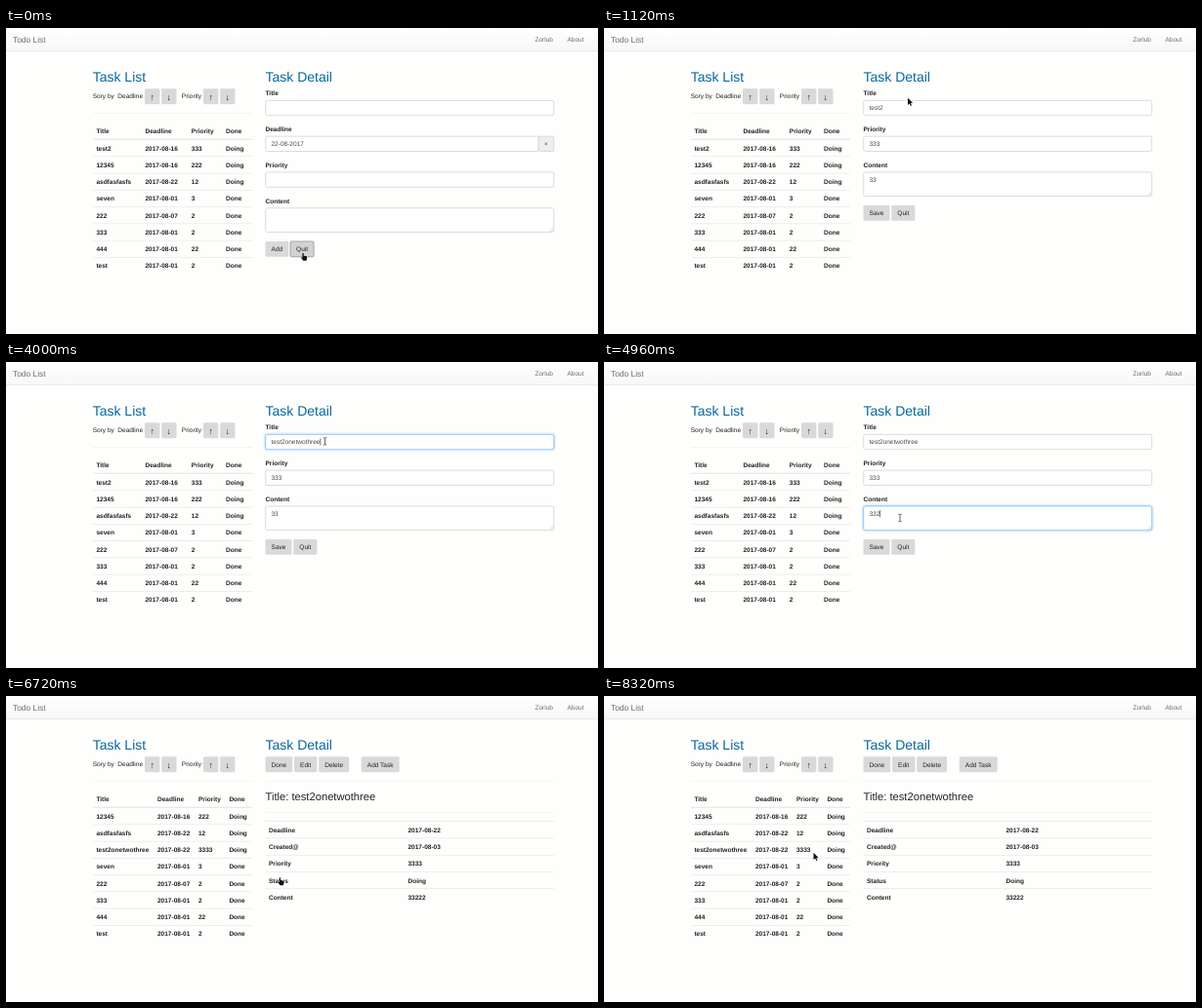
Write an HTML page that moves like this. It is 606x314 px and loops after 8480 ms.

```html
<!DOCTYPE html>
<html lang="en">
<head>
<meta charset="utf-8">
<title>Todo List</title>
<style>
html, body { margin: 0; width: 100%; height: 100%; overflow: hidden; background: #fefefd; }
svg { display: block; width: 100vw; height: 100vh; }
text { font-family: "Liberation Sans", Arial, sans-serif; text-rendering: geometricPrecision; white-space: pre; }
.focus { filter: drop-shadow(0 0 1.6px rgba(102, 175, 233, .75)); }
</style>
</head>
<body>
<svg id="stage" viewBox="0 0 606 314"></svg>
<script>
const stage = document.getElementById('stage');
const ruler = document.createElement('canvas').getContext('2d');
ruler.font = '100px "Liberation Sans", Arial, sans-serif';

const LOOP = 8480, FONT = 6.53, ROW = 17.25;
const LEFT = 265.5, RIGHT = 561, INPUT_H = 15.85;
const widthOf = s => ruler.measureText(s).width * FONT / 100;

// y is the middle of the capitals
const text = (x, y, s, { size = FONT, fill = '#222', bold = false, anchor = 'start' } = {}) =>
  `<text x="${x}" y="${y + size * .36}" font-size="${size}" fill="${fill}" text-anchor="${anchor}"` +
  `${bold ? ' font-weight="700"' : ''}>${s}</text>`;
const strong = (x, y, s) => text(x, y, s, { bold: true });
const rect = (x, y, w, h, fill, extra = '') =>
  `<rect x="${x}" y="${y}" width="${w}" height="${h}" fill="${fill}" ${extra}/>`;
const rule = (x1, x2, y, color = '#ddd', w = .5) => rect(x1, y - w / 2, x2 - x1, w, color);

function button(x, y, label, pressed) {
  const w = widthOf(label) + 12.1;
  const size = label.length > 1 ? FONT : 9;
  const edge = pressed ? 'stroke="#8c8c8c" stroke-width=".7"' : '';
  return rect(x, y, w, INPUT_H, pressed ? '#d2d2d2' : '#d9d9d9', `rx="1.3" ${edge}`) +
    text(x + w / 2, y + 8, label, { size, anchor: 'middle' });
}

function buttonRow(x, y, labels, pressed) {
  let out = '';
  for (const label of labels) {
    out += button(x, y, label, label === pressed);
    x += widthOf(label) + 13.9;
  }
  return out;
}

function field(label, y, value, { focus, caret, underline, h = INPUT_H, w = RIGHT - LEFT } = {}) {
  const mid = y + 7.9, end = 271.5 + widthOf(value);
  const edge = focus ? 'stroke="#66afe9" class="focus"' : 'stroke="#c4c4c4"';
  let out = strong(LEFT, y - 7, label) +
    rect(LEFT + .25, y + .25, w - .5, h - .5, '#fff', `rx="1.8" stroke-width=".6" ${edge}`) +
    text(271.5, mid, value, { fill: '#4a4a4a' });
  if (underline) out += rule(271.5, end, mid + 3.6, '#888');
  if (caret) out += rect(end, mid - 3.6, .6, 7.2, '#222');
  if (h > INPUT_H) {
    const b = y + h - 1;
    out += `<path d="M556.5 ${b}l3.5-3.5M558.5 ${b}l1.5-1.5" stroke="#999" stroke-width=".4"/>`;
  }
  return out;
}

function taskList(saved) {
  const rows = [
    ['12345', '2017-08-16', '222'], ['asdfasfasfs', '2017-08-22', '12'],
    ['seven', '2017-08-01', '3'], ['222', '2017-08-07', '2'], ['333', '2017-08-01', '2'],
    ['444', '2017-08-01', '22'], ['test', '2017-08-01', '2']
  ];
  if (saved) rows.splice(2, 0, ['test2onetwothree', '2017-08-22', '3333']);
  else rows.unshift(['test2', '2017-08-16', '333']);
  const cols = saved ? [92.4, 155, 197, 228.4] : [92.4, 142.5, 189.8, 225];
  const line = (cells, y) => cells.map((c, i) => strong(cols[i], y, c)).join('');

  let out = line(['Title', 'Deadline', 'Priority', 'Done'], 105.7) + rule(89, 252, 114.2, '#ddd', .8);
  rows.forEach((row, i) => {
    const y = 123.3 + i * ROW;
    out += line([...row, i < 3 ? 'Doing' : 'Done'], y);
    if (i) out += rule(89, 252, y - 8.7);
  });
  return out;
}

function page(saved) {
  const heading = { size: 14, fill: '#06689b' }, nav = { fill: '#6c6c6c' };
  return '<linearGradient id="bar" x2="0" y2="1"><stop stop-color="#fff"/>' +
    '<stop offset="1" stop-color="#f7f7f7"/></linearGradient>' +
    rect(0, 0, 606, 23.5, 'url(#bar)') + rule(0, 606, 23.6, '#e0e0e0', .6) +
    text(7, 11.8, 'Todo List', { size: 8.4, ...nav }) +
    text(541.5, 11.8, 'Zorlub', nav) + text(574.5, 11.8, 'About', nav) +
    text(88.7, 50, 'Task List', heading) + text(LEFT, 50, 'Task Detail', heading) +
    text(88.7, 70, 'Sory by') + text(114.3, 70, 'Deadline') + text(179.8, 70, 'Priority') +
    buttonRow(142, 62.3, ['↑', '↓']) + buttonRow(202, 62.3, ['↑', '↓']) +
    rule(89, 252, 87.5, '#e8e8e8') + taskList(saved);
}

const views = {
  add: s =>
    field('Title', 74.1, '') +
    field('Deadline', 110.9, '22-08-2017', { w: 280 }) +
    rect(545.2, 111.15, 15.6, 15.35, '#eee', 'rx="1.8" stroke="#c4c4c4" stroke-width=".6"') +
    text(553, 118.8, '×', { fill: '#4a4a4a', anchor: 'middle' }) +
    field('Priority', 147.7, '') +
    field('Content', 184.5, '', { h: 25.2 }) +
    buttonRow(LEFT, 218.9, ['Add', 'Quit'], s.press),

  edit: s => {
    const opts = name => ({ focus: s.focus === name, caret: s.focus === name && s.caret });
    const spinner = s.focus === 'prio'
      ? rect(549, 114.6, 5.2, 8.6, '#eee', 'rx=".8"') +
        '<path d="M550 118.1l1.6-2 1.6 2zM550 119.8l1.6 2 1.6-2z" fill="#444"/>' : '';
    return field('Title', 74.1, s.title, { ...opts('title'), underline: s.underline }) +
      field('Priority', 110.9, s.prio, opts('prio')) + spinner +
      field('Content', 147.7, s.content, { ...opts('content'), h: 25.2 }) +
      buttonRow(LEFT, 182, ['Save', 'Quit'], s.press);
  },

  blank: () => button(363.7, 62.3, 'Add Task') + rule(LEFT, RIGHT, 87.5, '#e8e8e8'),

  task: s => {
    const facts = [
      ['Deadline', s.saved ? '2017-08-22' : '2017-08-16'], ['Created@', '2017-08-03'],
      ['Priority', s.prio], ['Status', 'Doing'], ['Content', s.content]
    ];
    return views.blank() + buttonRow(LEFT, 62.3, ['Done', 'Edit', 'Delete']) +
      text(LEFT, 102.8, 'Title: ' + s.title, { size: 11.19 }) +
      rule(LEFT, RIGHT, 119.5, '#e8e8e8') +
      facts.map(([name, value], i) => {
        const y = 137.5 + i * ROW;
        return rule(LEFT, RIGHT, y - 8.8) + strong(269, y, name) + strong(411.5, y, value);
      }).join('');
  }
};

const outlined = 'fill="#111" stroke="#fff" stroke-width=".5" paint-order="stroke"';
const pointers = {
  arrow: `<path d="M0 0V7.2L1.7 5.7 2.8 8.3 4 7.8 2.9 5.3H5.1Z" ${outlined}/>`,
  hand: `<path d="M.7.5Q1.4-.2 2 .5V3L5 3.7Q5.7 4 5.5 5L4.9 8.3H1.6L-.7 5.2Q-.3 4.2.7 5Z" ${outlined}/>`,
  beam: '<path d="M-1.7-3.7H-.5L0-3.2.5-3.7H1.7M0-3.2V3.2M-1.7 3.7H-.5L0 3.2.5 3.7H1.7" ' +
    'fill="none" stroke="#222" stroke-width=".7"/>'
};

const at = (kind, x, y) => ({ pointer: [kind, x, y] });

// Each step changes part of the state from its time on
const steps = [
  [0, { view: 'add', press: 'Quit', saved: false, title: 'test2', prio: '333', content: '33', ...at('hand', 302.7, 230.5) }],
  [160, { view: 'blank', press: '', ...at('arrow', 297, 222) }],
  [320, at('arrow', 270, 172)],
  [480, at('hand', 240, 122)],
  [640, { view: 'task', ...at('hand', 239.5, 121) }],
  [800, at('arrow', 275, 95)],
  [960, at('hand', 306, 70)],
  [1120, { view: 'edit', ...at('arrow', 311, 71.7) }],
  [1280, at('arrow', 313, 72)],
  [1440, at('beam', 319, 79)],
  [1600, { focus: 'title', caret: true, ...at('beam', 324, 81) }],
  [1760, at('beam', 326, 81.2)],
  [1920, { underline: true, ...at('beam', 326.5, 81.4) }],
  [2240, { caret: false }],
  [2400, { caret: true }],
  [2720, { title: 'test2on', underline: false }],
  [2880, { title: 'test2one' }],
  [3200, { title: 'test2onetw' }],
  [3360, { title: 'test2onetwo' }],
  [3680, { title: 'test2onetwot' }],
  [3840, { title: 'test2onetwothr' }],
  [4000, { title: 'test2onetwothree' }],
  [4320, at('beam', 322, 97)],
  [4480, at('beam', 311, 140)],
  [4640, { focus: 'content', ...at('beam', 303, 158) }],
  [4800, at('beam', 303, 160)],
  [4960, { content: '332' }],
  [5120, { content: '3322' }],
  [5280, { content: '33222' }],
  [5440, at('beam', 306, 140)],
  [5600, { focus: 'prio', ...at('beam', 309.5, 124.5) }],
  [5760, { prio: '3333' }],
  [5920, at('beam', 303, 150)],
  [6080, at('arrow', 288, 177)],
  [6240, at('hand', 279, 186)],
  [6560, { press: 'Save', focus: '' }],
  [6720, { view: 'task', saved: true, press: '' }],
  [6880, at('beam', 279.5, 188.2)],
  [7360, at('arrow', 286, 186.7)],
  [7680, at('arrow', 296.8, 181)],
  [8000, at('arrow', 272, 177)],
  [8160, at('arrow', 232, 165)],
  [8320, at('arrow', 214.5, 160.7)]
];

let shown = -1;
function frame() {
  const t = performance.now() % LOOP;
  const count = steps.filter(([start]) => start <= t).length;
  if (count !== shown) {
    shown = count;
    const s = Object.assign({}, ...steps.slice(0, count).map(step => step[1]));
    const [kind, x, y] = s.pointer;
    stage.innerHTML = page(s.saved) + views[s.view](s) +
      `<g transform="translate(${x} ${y})">${pointers[kind]}</g>`;
  }
  requestAnimationFrame(frame);
}
frame();
</script>
</body>
</html>
```
